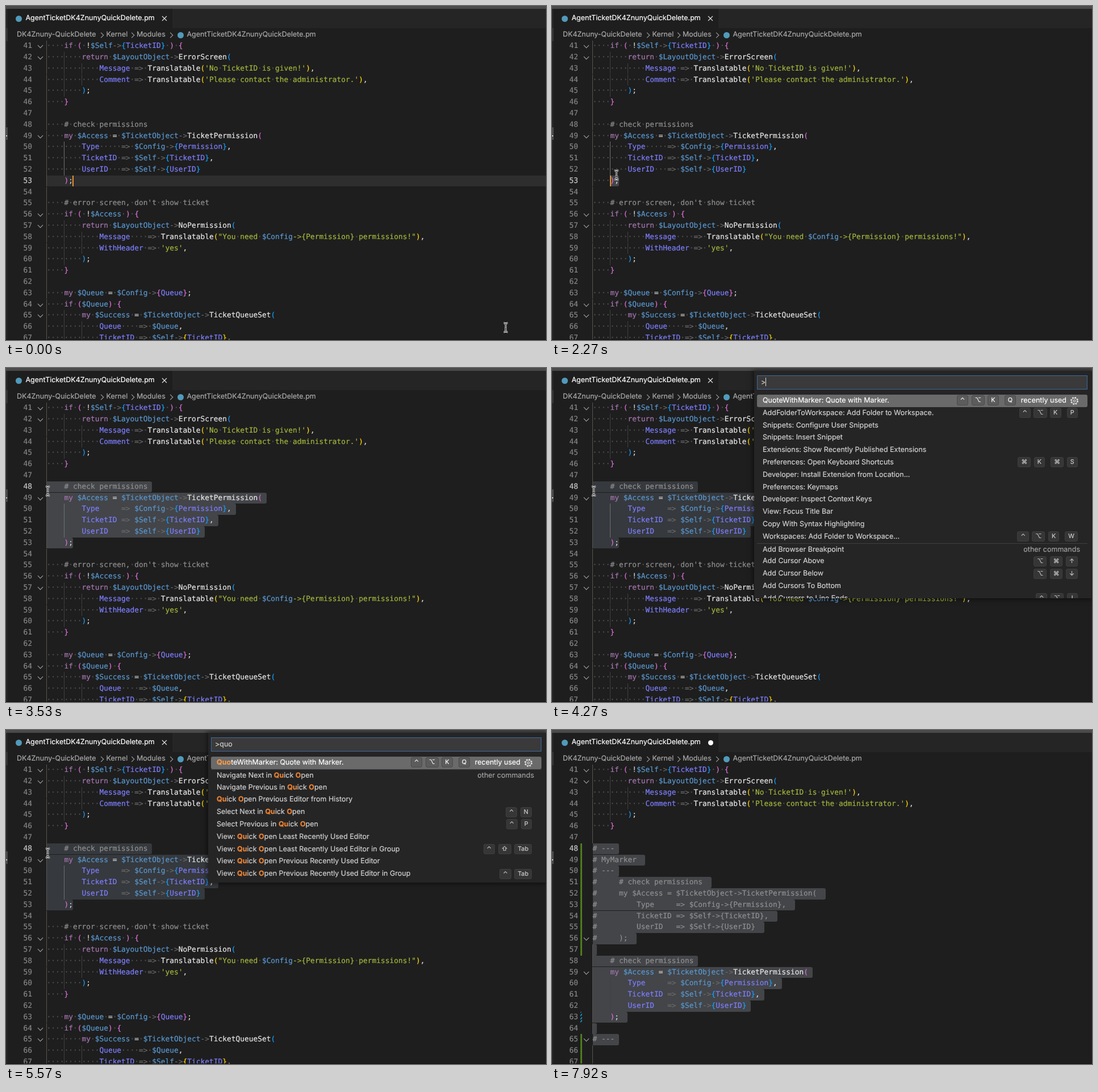
Animation of 951 by 589 pixels, one loop 8 s. Source, as an HTML page:

```html
<!DOCTYPE html>
<html lang="en">
<head>
<meta charset="utf-8">
<title>Quote with Marker</title>
<style>
html, body { margin: 0; width: 100%; height: 100%; overflow: hidden; background: #1e1e1e; }
#stage { position: relative; width: 951px; height: 589px; overflow: hidden; background: #1e1e1e;
  font: 12.5px/22px Inter, "DejaVu Sans", sans-serif; color: #ccc; text-rendering: geometricPrecision;
  -webkit-text-stroke: .2px; }
#stage div, #stage svg { position: absolute; white-space: pre; box-sizing: border-box; }
.layer { inset: 0; }
.row, .num { height: 19.8px; font: 12.87px/19.8px "DejaVu Sans Mono", monospace; }
.row { left: 71.5px; color: #d6d6d6; }
.raw .row { color: #c6c6c6; }
.dots .row { color: #565656; }
.num { left: 0; width: 46px; text-align: right; color: #858585; }
.num.on { color: #b4b4b4; }
.com { color: #8f8f8f; } .str { color: #a3b53c; } .var { color: #5a98d0; } .key { color: #a676b0; }
.arr { color: #6c6c6c; } .fn { color: #e8e8e8; } .hash { color: #7e7eff; }
.b0 { color: #ffd700; } .b1 { color: #da70d6; } .b2 { color: #179fff; }
.guide { width: 1px; background: #404040; }
.guide.first { background: #57564f; } .guide.lit { background: #707070; }
.chev { width: 7px; height: 7px; border: solid #a8a8a8; border-width: 0 1px 1px 0; transform: rotate(45deg); }
.crumbs { left: 0; top: 40px; color: #a9a9a9; }
.crumbs div { top: 0; }
.crumbs .chev { top: 8px; transform: rotate(-45deg); }
.sel { background: #434549; border-radius: 0 3px 3px 0; }
.blur .sel { background: #36393d; }
.caret { width: 2px; height: 19.8px; background: #e8912d; }
.icon { width: 11px; height: 11px; border-radius: 50%; background: #519aba; }
.crumbs .icon { top: 5.5px; }
.bar { left: 50px; width: 3px; background: #4b7d1c; }
.bar.mod { background: repeating-linear-gradient(135deg, #1b81a8 0 2px, #1e1e1e 2px 4px); }
.box { left: 356px; top: 5px; width: 594px; overflow: hidden; background: #252526;
  box-shadow: 0 0 8px 2px rgba(0,0,0,.5); }
.input { left: 5px; top: 8px; width: 582px; height: 25px; padding-left: 6px; line-height: 24px;
  background: #3a3a3b; border: 1px solid #41699a; }
.input b { display: inline-block; vertical-align: -3px; width: 1px; height: 15px; background: #ddd; }
.item { left: 5px; width: 582px; height: 21.8px; padding-left: 10px; line-height: 21.8px; color: #d2d2d2; }
.item.on { background: #6a6a6b; border-radius: 3px; color: #fff; }
.item.rule { border-top: 1px solid #404044; }
.item strong { color: #ee8433; font-weight: 700; }
.item.on strong { color: #f59a4a; }
#stage .note { right: 13px; top: 0; color: #a0a0a0; }
#stage .on .note { right: 37px; color: #fff; }
#stage .keys { right: 17px; top: 1.5px; display: flex; gap: 5.5px; }
#stage .on .keys { right: 126px; }
.keys span { height: 18px; min-width: 19.5px; padding: 0 5px; box-sizing: border-box; text-align: center;
  font-size: 10.8px; line-height: 16px; background: #363637; border: 1px solid #3e3e40; border-radius: 3px; color: #ccc; }
.keys .gap { margin-left: 4.5px; }
.on .keys span { background: #5c5c5d; border-color: #4a4a4b; color: #fff; }
</style>
</head>
<body>
<div id="stage">
  <div style="left:0;top:0;width:951px;height:39px;background:#252526"></div>
  <div style="left:0;top:0;width:951px;height:5px;background:#4a4a4a"></div>
  <div style="left:3px;top:5px;width:290px;height:34px;background:#1e1e1e"></div>
  <div style="left:0;top:39px;width:3px;height:550px;background:#242425"></div>
  <div style="left:0;top:39px;width:3px;height:23px;background:#343434"></div>
  <div style="left:0;top:214px;width:3px;height:22px;background:#4a4a4a"></div>
  <div style="left:0;top:228px;width:2px;height:2px;background:#ccc"></div>
  <div class="icon" style="left:16.5px;top:16.5px"></div>
  <div style="left:34.5px;top:11px;color:#fff">AgentTicketDK4ZnunyQuickDelete.pm</div>
  <svg id="cross" style="left:274px;top:17px" width="10" height="10"><path d="M1 1L9 9M9 1L1 9" stroke="#ddd" stroke-width="1.2"/></svg>
  <div id="dirty" style="left:274.5px;top:18px;width:9px;height:9px;border-radius:50%;background:#fff"></div>
  <div class="crumbs">
    <div style="left:19px">DK4Znuny-QuickDelete</div><div class="chev" style="left:164px"></div>
    <div style="left:176.5px">Kernel</div><div class="chev" style="left:218px"></div>
    <div style="left:230px">Modules</div><div class="chev" style="left:286px"></div>
    <div class="icon" style="left:302px"></div>
    <div style="left:318.5px">AgentTicketDK4ZnunyQuickDelete.pm</div>
  </div>
  <svg id="mouse" style="left:-8px;top:-12px;z-index:9" width="16" height="24" viewBox="-8 -12 16 24" fill="none">
    <defs><path id="bar" d="M-3.5-8Q-.8-8 0-6Q.8-8 3.5-8M0-6V6M-3.5 8Q-.8 8 0 6Q.8 8 3.5 8M-2 2.5H2"/></defs>
    <g id="beam"><use href="#bar" stroke="#eee" stroke-width="2.8"/><use href="#bar" stroke="#151515"/></g>
  </svg>
  <div style="left:0;top:588px;width:951px;height:1px;background:#111;z-index:4"></div>
</div>
<script>
const LOOP = 8000, X0 = 71.5, Y0 = 61.1, CW = 7.748, LH = 19.8, FIRST = 41;
const stage = document.getElementById('stage');
let rules = '', ruleCount = 0;

const pct = t => (t / LOOP * 100).toFixed(4) + '%';
const rowY = r => Y0 + r * LH;
const colX = c => X0 + c * CW;

function add(parent, cls, css = {}, text = '') {
  const el = document.createElement('div');
  el.className = cls;
  for (const k in css) el.style[k] = typeof css[k] === 'number' && k !== 'zIndex' ? css[k] + 'px' : css[k];
  el.textContent = text;
  parent.append(el);
  return el;
}
function span(parent, cls, text) {
  const el = document.createElement('span');
  el.className = cls;
  el.textContent = text;
  parent.append(el);
}
function animate(el, frames, ease) {
  const name = 'k' + ruleCount++;
  rules += `@keyframes ${name}{${frames}}`;
  el.style.animation = `${name} ${LOOP}ms ${ease} infinite`;
}
// visible only between each pair of times
function timed(el, ...times) {
  let frames = '0%{opacity:0}';
  times.forEach((t, i) => frames += `${pct(t)}{opacity:${i % 2 ? 0 : 1}}`);
  animate(el, frames, 'step-end');
  return el;
}
const layer = (z, cls = '') => add(stage, 'layer ' + cls, { zIndex: z });

const head = `    if ( !$Self->{TicketID} ) {
        return $LayoutObject->ErrorScreen(
            Message => Translatable('No TicketID is given!'),
            Comment => Translatable('Please contact the administrator.'),
        );
    }
`.split('\n');
const check = `    # check permissions
    my $Access = $TicketObject->TicketPermission(
        Type     => $Config->{Permission},
        TicketID => $Self->{TicketID},
        UserID   => $Self->{UserID}
    );`.split('\n');
const before = [...check, ...`
    # error screen, don't show ticket
    if ( !$Access ) {
        return $LayoutObject->NoPermission(
            Message    => Translatable("You need $Config->{Permission} permissions!"),
            WithHeader => 'yes',
        );
    }

    my $Queue = $Config->{Queue};
    if ($Queue) {
        my $Success = $TicketObject->TicketQueueSet(
            Queue    => $Queue,
            TicketID => $Self->{TicketID},`.split('\n')];
const quoted = check.map(l => '# ' + l + ' ');
const after = ['# ---', '# MyMarker ', '# ---', ...quoted, '',
  ...check.slice(0, 5), check[5] + ' ', '', '# ---', '', ''];

const PERL = /(#.*)|('[^']*'|"[^"]*")|(\$\w+)|\b(if|my|return)\b|(->|=>)|([(){}])|(\w+)(?=\()|(\w+)|(\s+|.)/g;
const PLAIN = /()()()()()([(){}])|()()([^(){}]+)/g;
const KINDS = ['com', 'str', 'var', 'key', 'arr', 'br', 'fn', 'hash', ''];

function paint(row, line, plain, depth) {
  for (const m of line.matchAll(plain ? PLAIN : PERL)) {
    const text = m[0], kind = KINDS[m.slice(1).findIndex(Boolean)];
    if (kind === 'br') {
      const open = '({'.includes(text);
      if (!open) depth--;
      span(row, 'b' + depth % 3, text);
      if (open) depth++;
    } else if (kind === 'str') {
      text.split(/(\$\w+)/).forEach((s, i) => span(row, i % 2 ? 'var' : 'str', s));
    } else span(row, kind, text);
  }
  return depth;
}
function code(lines, start, folds, times, plain) {
  const dots = layer(0, 'dots'), text = layer(2, plain ? 'raw' : '');
  let depth = 1;
  lines.forEach((line, i) => {
    const r = start + i, top = rowY(r);
    if (!plain) add(dots, 'row', { top }, line.replace(/./g, ch => ch === ' ' ? '·' : ' '));
    const indent = line ? line.search(/\S/) : 4;
    for (let c = 0; c < indent; c += 4) {
      const lit = c && lines === before && i > 1 && i < 5;
      add(text, 'guide' + (c ? lit ? ' lit' : '' : ' first'), { left: Math.floor(colX(c)), top, height: LH });
    }
    depth = paint(add(text, 'row', { top }), line, plain, depth);
  });
  folds.forEach(n => add(text, 'chev', { left: 56.5, top: rowY(n - FIRST) + 5 }));
  if (times) [dots, text].forEach(el => timed(el, ...times));
}
code(head, 0, [41, 42]);
code(before, 7, [49, 56, 57, 64, 65], [0, 6060]);
code(after, 7, [52], [6060, 6140], true);
code(after, 7, [56, 59, 65], [6140, LOOP]);

const numbers = layer(2);
const number = (parent, r, cls) => add(parent, 'num ' + cls, { top: rowY(r) }, FIRST + r);
for (let r = 0; r < 27; r++) number(numbers, r, '');

// caret and current line before the drag
const current = timed(layer(1), 0, 2190);
add(current, '', { left: 71, top: rowY(12), width: 880, height: LH, background: '#2e2e2e' });
timed(number(layer(2), 12, 'on'), 0, 2190);
const caret = (r, c, ...times) =>
  timed(add(stage, 'caret', { left: colX(c) - .9, top: rowY(r), zIndex: 3 }), ...times);
caret(12, 6, 0, 490, 980, 1470, 1960, 2190);

function select(lines, r0, c0, r1, c1, t0, t1, cls = '') {
  const el = timed(layer(1, cls), t0, t1);
  for (let r = r0; r <= r1; r++) {
    const from = r === r0 ? c0 : 0, to = r === r1 ? c1 : lines[r - 7].length + 1;
    if (to > from) add(el, 'sel', { left: colX(from), top: rowY(r), width: (to - from) * CW, height: LH });
  }
  timed(number(layer(2), r0, 'on'), t0, t1);
}
// drag upwards: row and column under the pointer every 80 ms
const drag = [[12, 5], [12, 4], [11, 4], [11, 4], [10, 3], [9, 2], [8, 2], [8, 1], [7, 1], [7, 0]];
drag.forEach(([r, c], i) => {
  const t = 2190 + i * 80, end = i < 9 ? t + 80 : 4270;
  select(before, r, c, 12, 6, t, end);
  caret(r, c, t, Math.min(end, 3370));
});
select(before, 7, 0, 12, 6, 4270, 6060, 'blur');
select(after, 7, 0, 25, 0, 6060, LOOP);
caret(7, 0, 3860, 4270, 6060, 6550, 7040, 7540);

const gutter = timed(layer(2), 6220, LOOP);
add(gutter, 'bar', { top: rowY(7), height: LH * 10 });
add(gutter, 'bar', { top: rowY(24), height: LH * 3 });
add(gutter, 'bar mod', { top: rowY(22), height: LH });

timed(document.getElementById('cross'), 0, 6060);
timed(document.getElementById('dirty'), 6060, LOOP);

// command palette; keys: chords split by "|"
const OTHER = 'other commands';
const quote = ['QuoteWithMarker: Quote with Marker.', '⌃ ⌥ K|Q', 'recently used'];
const recent = [quote,
  ['AddFolderToWorkspace: Add Folder to Workspace.', '⌃ ⌥ K|P'],
  ['Snippets: Configure User Snippets'], ['Snippets: Insert Snippet'],
  ['Extensions: Show Recently Published Extensions'],
  ['Preferences: Open Keyboard Shortcuts', '⌘ K|⌘ S'],
  ['Developer: Install Extension from Location...'], ['Preferences: Keymaps'],
  ['Developer: Inspect Context Keys'], ['View: Focus Title Bar'],
  ['Copy With Syntax Highlighting'],
  ['Workspaces: Add Folder to Workspace...', '⌃ ⌥ K|W'],
  ['Add Browser Breakpoint', '', OTHER],
  ['Add Cursor Above', '⌥ ⌘ ↑'], ['Add Cursor Below', '⌥ ⌘ ↓'],
  ['Add Cursors To Bottom'], ['Add Cursors to Line Ends', '⌃ ⌥ I']];
const found = [quote,
  ['Navigate Next in Quick Open', '', OTHER], ['Navigate Previous in Quick Open'],
  ['Quick Open Previous Editor from History'],
  ['Select Next in Quick Open', '⌃ N'], ['Select Previous in Quick Open', '⌃ P'],
  ['View: Quick Open Least Recently Used Editor'],
  ['View: Quick Open Least Recently Used Editor in Group', '⌃ ⇧ Tab'],
  ['View: Quick Open Previous Recently Used Editor'],
  ['View: Quick Open Previous Recently Used Editor in Group', '⌃ Tab']];
const wide = [...found.slice(0, 3), ['Quick Fix...', '⌘ .'], found[3], ['Quick Search'],
  ...found.slice(4, 6), ['View: Quick Input Back'], ['View: Quick Input Next'], ...found.slice(6)];

function label(el, text, query) {
  const q = text.indexOf('Q'), whole = text[q + 2] === 'o';
  const o = whole ? q + 2 : text.indexOf('O', q);
  const hits = query ? [q, q + 1, o].slice(0, query.length) : [];
  let at = 0;
  while (at < text.length) {
    const hit = hits.includes(at);
    let end = at;
    while (end < text.length && hits.includes(end) === hit) end++;
    const part = document.createElement(hit ? 'strong' : 'span');
    part.textContent = text.slice(at, end);
    el.append(part);
    at = end;
  }
}
function palette(query, items, height, t0, t1, caretEnd = t1) {
  const box = add(timed(layer(5), t0, t1), 'box', { height });
  const input = add(box, 'input', {}, '>' + query);
  const bar = document.createElement('b');
  input.append(bar);
  timed(bar, t0, caretEnd);
  items.forEach(([text, keys, note], i) => {
    const el = add(box, 'item' + (i ? note ? ' rule' : '' : ' on'), { top: 41.9 + i * 21.8 });
    label(el, text, query);
    if (note) add(el, 'note', {}, note);
    if (keys) {
      const group = add(el, 'keys');
      keys.split('|').forEach((chord, c) =>
        chord.split(' ').forEach((k, j) => span(group, c && !j ? 'gap' : '', k)));
    }
    if (!i) el.insertAdjacentHTML('beforeend', `<svg style="right:15px;top:3px" width="16" height="16"
      viewBox="-8 -8 16 16" fill="none" stroke="#eee"><circle r="6.2" stroke-width="1.6" stroke-dasharray="2.5 2.37"/>
      <circle r="4.9"/><circle r="1.9"/></svg>`);
  });
}
palette('', recent, 401, 4270, 4750);
palette('q', wide, 351, 4750, 4910);
palette('qu', wide, 351, 4910, 5070);
palette('quo', found, 264, 5070, 6060, 5570);

// pointer: time, x, y; held for 80 ms at a time
const path = [[0, 880, 567], [1300, 880, 567], [1310, 428, 535], [1390, 350, 478], [1470, 283, 427],
  [1550, 226, 386], [1630, 190, 358], [1710, 164, 339], [1870, 136, 319], [2110, 121, 309],
  [2190, 119, 307], [2350, 108, 289], [2510, 96, 262], [2670, 85.5, 231], [2830, 76, 215],
  [2990, 63, 210.5], [3310, 63, 210.5], [3530, 73.5, 217], [7610, 73.5, 217], [7690, 95, 235],
  [7770, 270, 350], [7850, 570, 508], [8000, 570, 508]];
const moves = path.map(([t, x, y], i) => {
  const next = path[i + 1] || [t + 80];
  const n = Math.max(1, Math.round((next[0] - t) / 80));
  return `${pct(t)}{transform:translate(${x}px,${y}px);animation-timing-function:steps(${n})}`;
}).join('');
animate(document.getElementById('mouse'), moves, 'linear');
timed(document.getElementById('beam'), 0, 90, 1310, 7920);

const style = document.createElement('style');
style.textContent = rules;
document.head.append(style);
</script>
</body>
</html>
```
